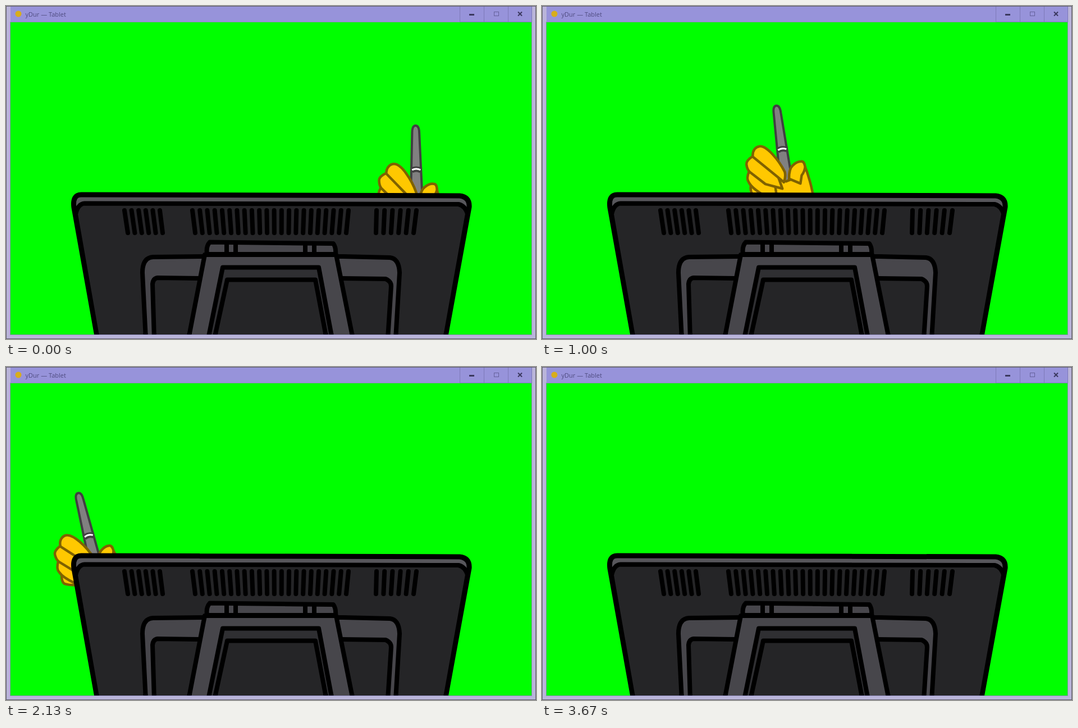
Animation of 944x593 px, one loop 4390 ms. Source, as an HTML page:

```html
<!DOCTYPE html>
<html lang="en">
<head>
<meta charset="utf-8">
<title>Pen and tablet</title>
<style>
  html, body { margin: 0; width: 100%; height: 100%; overflow: hidden; }
  svg { display: block; width: 100vw; height: 100vh; }
  text { font: 11px "Open Sans", "Noto Sans", sans-serif; fill: #4f4c80; }
  .line { stroke: #000; stroke-width: 8; stroke-linejoin: round; stroke-linecap: round; fill: none; }
  .edge { stroke-width: 9; }
  .dark { fill: #252527; }
  .mid { fill: #2f2f32; }
  .grey { fill: #47464b; }
  .rim { fill: #57565b; }
  .skin { fill: #ffc800; stroke: #7f6200; stroke-width: 4.5; stroke-linejoin: round; stroke-linecap: round; }
  .pen { fill: #808080; stroke: #404040; stroke-width: 4; }
  .band { fill: none; stroke: #404040; stroke-width: 10; }
  .shine { fill: none; stroke: #fff; stroke-width: 3; }
  .button { fill: none; stroke: #7d79b8; }
</style>
</head>
<body>
<svg viewBox="0 0 944 593" preserveAspectRatio="none">
  <rect width="944" height="593" fill="#0f0"/>

  <!-- Hand; the origin is the top end of the pen -->
  <g id="hand">
    <path class="pen" d="M-10.5 150L-6.3 16Q-6.5 2 0 2Q6.5 2 6.5 16L11.5 150Z"/>
    <path class="band" d="M-8 82Q0 77 9 82"/>
    <path class="shine" d="M-7 81Q0 77 8 81"/>
    <path class="skin" d="M28 131L35 109Q40 126 42 142Q48 180 42 240H-32Q-28 185-42 159L-14 128L0 138Z"/>
    <path class="skin" d="M-63 137Q-66 148-62 153Q-54 158-40 161L-25 150Z"/>
    <path class="skin" d="M-63 112Q-70 124-66 131Q-62 142-43 157L-20 160L-20 130Z"/>
    <path class="skin" d="M-53 86Q-66 92-66 99Q-66 108-62 113L-37 138L-8 150L-13 127Z"/>
    <path class="skin" d="M-53 87C-53 76-46 70-39 70C-26 70-8 98 0 121Q1 130-4 139L-14 128Z"/>
    <path class="skin" d="M6 134Q8 116 16 111Q24 105 31 106C36 106 37 112 37 117Q35 125 29 131L25 145Z"/>
  </g>

  <!-- Tablet -->
  <path class="line edge rim" d="M163 593L121 359Q118 336 134 336L808 338Q826 340 825 358L782 593Z"/>
  <path class="line dark" d="M163 593L124 371Q128 352 140 351.500L806 353Q818 356 822 370L782 593Z"/>
  <path id="vents" class="line"/>
  <path class="line grey" d="M249 593L243 475Q243 448 262 447L350 446H600L684 448Q700 450 701 475L694 593Z"/>
  <path class="line dark" d="M264 593L261 495Q262 485 270 484L345 485H598L676 486Q686 490 686 499L680 593Z"/>
  <path class="line grey" d="M358 442Q356 428 363 420.500L583 423Q588 430 587 442Z"/>
  <path class="line" d="M393 424V442M409 424V442M533 425V442M549 425V442"/>
  <path class="line grey" d="M325 593L354 443H588L618 593Z"/>
  <path class="line mid" d="M360 593L386 465.500H557L581 593Z"/>
  <path class="line dark" d="M371 593L394 487.500H551L571 593Z"/>

  <!-- Window frame -->
  <path fill="#bab5da" d="M0 0H8V585H936V0H944V593H0Z"/>
  <rect x="8" width="929" height="29" fill="#9793da"/>
  <rect x="7.500" y="28.500" width="929" height="557" fill="none" stroke="#8f8bbd"/>
  <rect x=".5" y=".5" width="943" height="592" fill="none" stroke="#5d5b68"/>
  <path class="button" d="M808.500 1V28.500H936.500V1M851.500 1V28M894.500 1V28"/>
  <rect x="825" y="14" width="9" height="3" fill="#3b395f"/>
  <rect x="869.500" y="10.500" width="8" height="7" fill="none" stroke="#65619c"/>
  <path d="M912 10.500L919 17.500M919 10.500L912 17.500" stroke="#3b395f" stroke-width="2"/>
  <circle cx="22" cy="14" r="5.500" fill="#d8ad1c"/>
  <text x="34.500" y="19">yDur — Tablet</text>
</svg>
<script>
const LOOP = 4390, STEP = 200 / 3;
const mix = (a, b, u) => a + (b - a) * u;

// A row of vents whose lean changes evenly from one end to the other
function ventRow(count, left, right, leanLeft, leanRight) {
  return Array.from({ length: count }, (_, i) => {
    const u = i / (count - 1);
    return `M${mix(left, right, u)} 364l${mix(leanLeft, leanRight, u)} 40`;
  }).join("");
}
document.getElementById("vents").setAttribute("d",
  ventRow(6, 211, 274, 6, 5) + ventRow(22, 332, 610, 5, -4) + ventRow(6, 660, 731, -1, -5));

// Ends of the strokes after the opening circle: step, x, y
const CIRCLE_END = 11;
const strokes = [
  [CIRCLE_END, 752, 223], [12, 780, 165], [14, 88, 153], [16, 746, 198], [18, 150, 206],
  [20, 136, 241], [25, 122, 206.5], [29, 143, 197], [32, 128, 222.5],
  [37, 132, 333], [40, 207.5, 324], [43, 450, 153], [49, 658, 180],
  [51, 54, 153], [55, 400, 400]
];

function penAt(step) {
  if (step < CIRCLE_END) {
    const angle = Math.PI * (1 + 1.42 * step / CIRCLE_END);
    return [748 + 18.5 * Math.cos(angle), 211 + 14 * Math.sin(angle)];
  }
  const i = strokes.findIndex(([end]) => end > step);
  if (i < 0) return strokes.at(-1).slice(1);
  const [s0, x0, y0] = strokes[i - 1], [s1, x1, y1] = strokes[i];
  const u = (step - s0) / (s1 - s0);
  return [mix(x0, x1, u), mix(y0, y1, u)];
}

const hand = document.getElementById("hand");
function draw() {
  const time = performance.now() % LOOP;
  const [x, y] = penAt(Math.floor((time + 3.4) / STEP));
  const tilt = (x - 755) * 0.0217;
  hand.setAttribute("transform", `translate(${x} ${y}) rotate(${tilt})`);
  requestAnimationFrame(draw);
}
draw();
</script>
</body>
</html>
```
